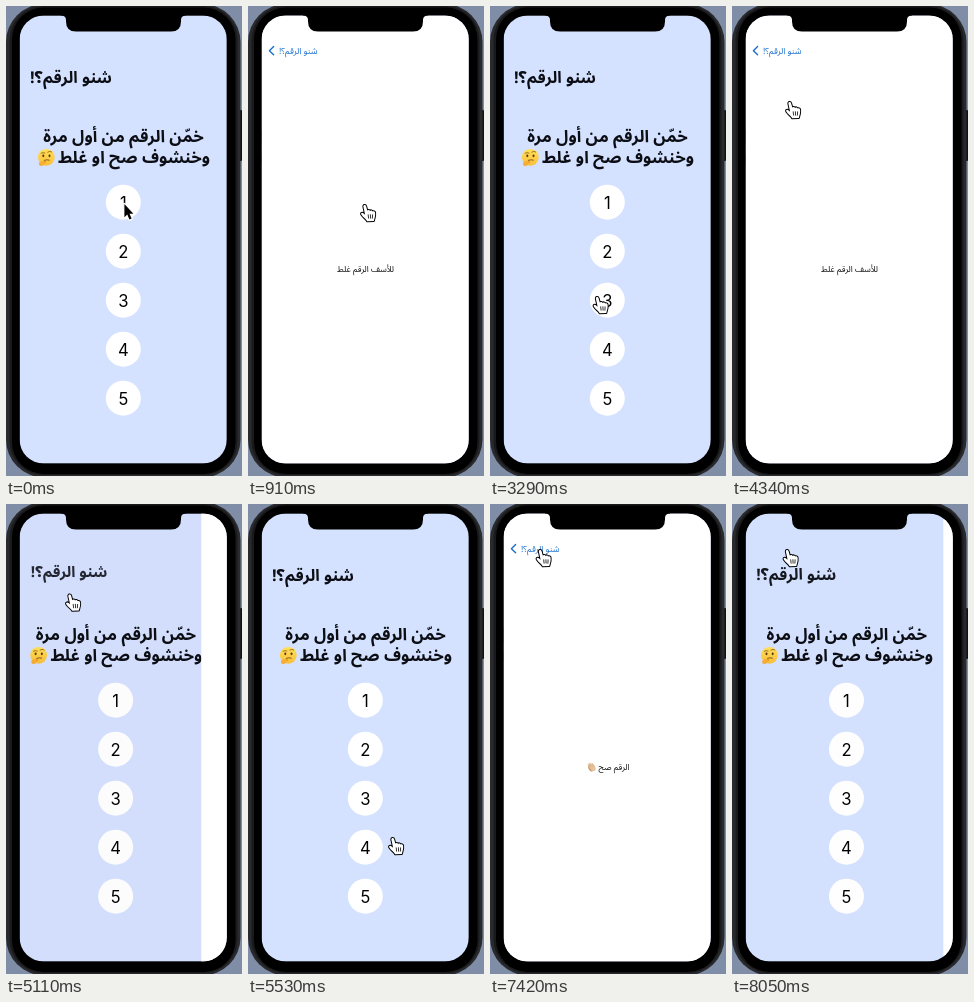
Animation of 236x470 px, one loop 8120 ms. Source, as an HTML page with a canvas:

```html
<!DOCTYPE html>
<html lang="ar">
<head>
<meta charset="utf-8">
<style>
  html, body { margin: 0; width: 100%; height: 100%; overflow: hidden; background: #7f8ea6; }
  canvas { display: block; width: 236px; height: 470px; }
</style>
</head>
<body>
<canvas id="stage"></canvas>
<script>
const canvas = document.getElementById('stage');
const ctx = canvas.getContext('2d');
const dpr = window.devicePixelRatio || 1;
canvas.width = 236 * dpr;
canvas.height = 470 * dpr;

const LOOP = 8120, STEP = 70;
const SCREEN = { x: 13.6, y: 9.4, w: 207.2, h: 448.2, r: 24 };
const ARABIC = '"Noto Sans Arabic", "DejaVu Sans Condensed", "DejaVu Sans", sans-serif';
const LATIN = 'Inter, "Liberation Sans", sans-serif';
const INK = '#0c0e14', BLUE = '#1b6fce';
const TITLE = 'شنو الرقم؟!';
const PROMPT = ['خمّن الرقم من أول مرة', 'وخنشوف صح او غلط'];
const WRONG = 'للأسف الرقم غلط', RIGHT = 'الرقم صح';

// Each visit to the answer page: push start, pop start, answer
const visits = [
  { push: 461, pop: 2104, right: false },
  { push: 3751, pop: 4904, right: false },
  { push: 6131, pop: 7774, right: true }
];

// Pointer path: time, centre x, centre y
const path = [
  [0, 120, 207], [1260, 120, 207], [1750, 61, 57], [2030, 61, 57],
  [2240, 60, 59], [2800, 110, 236], [3290, 110.5, 299], [3920, 110.5, 299],
  [4340, 61, 104], [4480, 54, 69], [4620, 52, 53.5], [4970, 52, 53.5],
  [5530, 148, 342], [5600, 138, 355], [5670, 133, 360], [5810, 120.5, 353],
  [6720, 120.5, 353], [7420, 53.5, 54], [7700, 53.5, 54], [8050, 58.5, 54],
  [LOOP, 58.5, 54]
];

const lerp = (a, b, k) => a + (b - a) * k;
const smooth = k => k * k * (3 - 2 * k);

// Critically damped spring, 0 to 1
function spring(ms) {
  if (ms <= 0) return 0;
  const a = ms * 0.0176;
  const v = 1 - Math.exp(-a) * (1 + a);
  return v > 0.996 ? 1 : v;
}

function pointerAt(t) {
  let i = 0;
  while (i < path.length - 2 && path[i + 1][0] <= t) i++;
  const [t0, x0, y0] = path[i], [t1, x1, y1] = path[i + 1];
  const k = smooth((t - t0) / (t1 - t0));
  return [lerp(x0, x1, k), lerp(y0, y1, k)];
}

// Type size at which a line is about as long as the layout asks
function sizeFor(str, length, weight) {
  ctx.font = `${weight} 100px ${ARABIC}`;
  return 100 * length / ctx.measureText(str).width;
}

const size = {
  title: sizeFor(TITLE, 82, 'bold'),
  back: sizeFor(TITLE, 38.5, 'normal'),
  prompt: sizeFor(PROMPT.join(' '), 317, 'bold'),
  answer: sizeFor(WRONG, 57, 'normal')
};

function roundRect(x, y, w, h, r, fill) {
  ctx.beginPath();
  ctx.roundRect(x, y, w, h, r);
  ctx.fillStyle = fill;
  ctx.fill();
}

function disc(x, y, rx, ry, fill, turn = 0) {
  ctx.beginPath();
  ctx.ellipse(x, y, rx, ry, turn, 0, 7);
  ctx.fillStyle = fill;
  ctx.fill();
}

function line(d, color, width) {
  ctx.strokeStyle = color;
  ctx.lineWidth = width;
  ctx.lineCap = ctx.lineJoin = 'round';
  ctx.stroke(new Path2D(d));
}

function text(str, x, y, font, color, align, dir = 'rtl') {
  ctx.font = font;
  ctx.direction = dir;
  ctx.textAlign = align;
  ctx.fillStyle = color;
  ctx.fillText(str, x, y);
}

function at(x, y, draw) {
  ctx.save();
  ctx.translate(x, y);
  draw();
  ctx.restore();
}

function thinkingFace() {
  const g = ctx.createLinearGradient(0, -9, 0, 9);
  g.addColorStop(0, '#ffe25c');
  g.addColorStop(1, '#fbbd35');
  disc(0, 0, 8.4, 8.4, g);
  disc(-3, -1.5, 1, 1.4, '#58350f');
  disc(3.2, -1.5, 1, 1.4, '#58350f');
  line('M-5.2-4.1Q-3.4-5.2-1.4-4.3M1.4-5.2Q3.6-6.8 5.4-5.4', '#8a5a18', 0.8);
  line('M-2 3Q.6 2 3 2.8', '#6b4210', 0.8);
  line('M-5.4 5.8L-1.2 4.8', '#f0a02c', 2.2);
  disc(-4.6, 6.4, 2.8, 2.2, '#f6ae35', -0.3);
}

function clappingHands() {
  ctx.rotate(-0.6);
  disc(-0.9, 0.8, 2.6, 3.5, '#c99a6e');
  disc(0.5, 1.4, 2.6, 3.4, '#e6c19a');
  line('M-1.6-.4V-3.6M-.1-.4V-4.2M1.3 0V-3.6M2.6 1V-2.2', '#dfb78d', 1.1);
}

function listPage(shift, dim) {
  ctx.fillStyle = '#d4e1ff';
  ctx.fillRect(SCREEN.x, SCREEN.y, SCREEN.w, SCREEN.h);
  at(shift, 0, () => {
    const bold = `bold ${size.prompt}px ${ARABIC}`;
    text(PROMPT[0], 117.5, 135.5, bold, INK, 'center');
    text(PROMPT[1], 204, 156.5, bold, INK, 'right');
    at(40.3, 151.3, thinkingFace);
    for (let n = 1; n <= 5; n++) {
      const y = 147.2 + n * 49;
      disc(117.3, y, 17.5, 17.5, '#fff');
      text(String(n), 117.3, y + 6.3, '16.6px ' + LATIN, '#000', 'center', 'ltr');
    }
  });
  ctx.fillStyle = `rgba(0,0,0,${dim})`;
  ctx.fillRect(SCREEN.x, SCREEN.y, SCREEN.w, SCREEN.h);
}

function answerPage(shift, right) {
  at(shift, 0, () => {
    ctx.fillStyle = '#fff';
    ctx.fillRect(SCREEN.x, SCREEN.y, SCREEN.w, SCREEN.h);
    const font = `${size.answer}px ${ARABIC}`;
    if (right) {
      text(RIGHT, 139.5, 266, font, '#111', 'right');
      at(101.5, 263, clappingHands);
    } else {
      text(WRONG, 117.5, 266, font, '#111', 'center');
    }
  });
}

// The large title shrinks into the back label
function navTitle(q) {
  const p = 1 - q;
  const x = lerp(31, 24, p), y = lerp(47.5, 77, p);
  const grow = lerp(1, size.title / size.back, p);
  ctx.globalAlpha = p;
  text(TITLE, x, y, `bold ${lerp(size.title * 0.46, size.title, p)}px ${ARABIC}`, INK, 'left');
  ctx.globalAlpha = q * q;
  text(TITLE, x, y, `${size.back * grow}px ${ARABIC}`, BLUE, 'left');
  ctx.globalAlpha = Math.max(0, 1 - p * 10);
  at(p * 50, 0, () => line('M25.6 40.6L21.4 44.7L25.6 48.8', BLUE, 1.4));
  ctx.globalAlpha = 1;
}

function phone() {
  ctx.fillStyle = '#7f8ea6';
  ctx.fillRect(0, 0, 236, 470);
  roundRect(233, 104, 3, 51, 1, '#111214');
  roundRect(0, -2, 234.5, 473.5, 38, '#292a2d');
  roundRect(3.5, 0, 228, 469, 34, '#1a1a1c');
  roundRect(6, 1.5, 223.5, 466.5, 32, '#000');
}

function notch() {
  ctx.fillStyle = '#000';
  ctx.fill(new Path2D('M55 8V9.4Q60 9.4 60 14V15.6Q60 25.6 70 25.6H165Q175 25.6 175 15.6V14Q175 9.4 180 9.4V8Z'));
}

const handShape = new Path2D('M3.4 2.6C3 .4 5.6 .1 6.1 2L7.3 6.4C7.8 5.4 9.7 5.5 10 6.7C10.7 5.8 12.4 6.1 12.7 7.4' +
  'C13.5 6.8 15 7.3 15.1 8.6C15.5 11.5 14.6 13.4 13.8 16.8L7.2 17C6 14.8 3 13.2 1.3 10.4C.5 8.8 2.2 8 3.6 9.2L5.1 10.6Z');
const arrowShape = new Path2D('M0 0V13.2L2.9 10.5L5 15.6L7.2 14.6L5.1 9.7H9Z');

function paint(shape, fill, edge, width) {
  ctx.lineJoin = 'round';
  ctx.lineWidth = width;
  ctx.strokeStyle = edge;
  ctx.fillStyle = fill;
  ctx.stroke(shape);
  ctx.fill(shape);
}

function pointer(t) {
  if (t < 280) {
    at(118.4, 198, () => paint(arrowShape, '#000', '#fff', 2.4));
    return;
  }
  const [x, y] = pointerAt(t);
  at(x - 8, y - 8.8, () => {
    paint(handShape, '#fff', '#000', 2);
    line('M8.2 10.6L8.6 14M10.4 10.5L10.6 14M12.6 10.6L12.4 14', '#000', 0.8);
  });
}

function draw(t) {
  ctx.setTransform(dpr, 0, 0, dpr, 0, 0);
  const visit = visits.filter(v => t >= v.push).pop() || visits[0];
  const q = spring(t - visit.push) * (1 - spring(t - visit.pop));

  phone();
  ctx.save();
  ctx.beginPath();
  ctx.roundRect(SCREEN.x, SCREEN.y, SCREEN.w, SCREEN.h, SCREEN.r);
  ctx.clip();
  listPage(-0.3 * SCREEN.w * q, 0.1 * q);
  if (q > 0) answerPage(SCREEN.w * (1 - q), visit.right);
  navTitle(q);
  ctx.restore();
  notch();
  pointer(t);
}

function tick() {
  const t = performance.now() % LOOP;
  draw(Math.floor(t / STEP) * STEP);
  requestAnimationFrame(tick);
}
tick();
</script>
</body>
</html>
```
